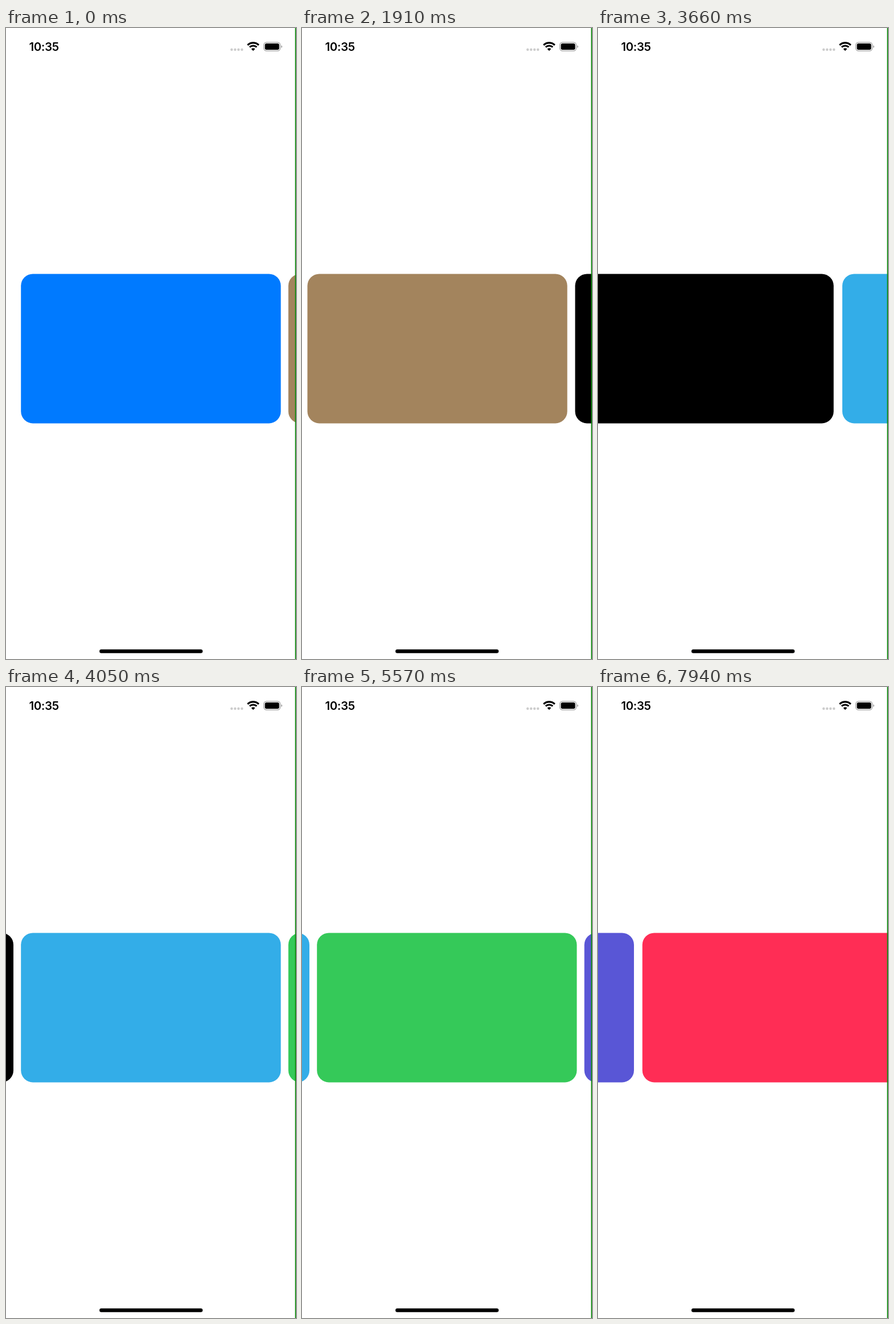
These frames come from a looping animation (508x1102 px, 8000 ms). An HTML page:

```html
<!DOCTYPE html>
<html lang="en">
<head>
<meta charset="utf-8">
<title>Card carousel</title>
<style>
  html, body { margin: 0; width: 100%; height: 100%; overflow: hidden; background: #fff; }
  svg { display: block; width: 100%; height: 100%; }
  text { font: 600 20.3px Inter, "Liberation Sans", sans-serif; letter-spacing: -.3px; }
</style>
</head>
<body>
<svg viewBox="0 0 508 1102">
  <g id="cards"></g>
  <path d="M507.2 0V1102" stroke="#0d8a0d" stroke-width="1.6"/>

  <text x="40.4" y="40">10:35</text>
  <g fill="#ccc">
    <circle cx="395.3" cy="37.8" r="2.2"/>
    <circle cx="401.3" cy="37.8" r="2.2"/>
    <circle cx="407.3" cy="37.8" r="2.2"/>
    <circle cx="413.3" cy="37.8" r="2.2"/>
  </g>
  <g transform="translate(433 40)">
    <g fill="none" stroke="#000" stroke-width="3.1">
      <path d="M-9.8 -10.2A14.3 14.3 0 0 1 9.8 -10.2"/>
      <path d="M-6.2 -6.6A9.1 9.1 0 0 1 6.2 -6.6"/>
    </g>
    <path d="M0 0L-3.4 -3.5A4.9 4.9 0 0 1 3.4 -3.5Z"/>
  </g>
  <rect x="451.6" y="25.1" width="28.8" height="14.8" rx="4.6" fill="none" stroke="#999" stroke-width="1.2"/>
  <rect x="453.5" y="27" width="25" height="11" rx="2.7"/>
  <path d="M482 30.2Q483.8 30.8 483.8 32.5T482 34.8Z" fill="#999"/>
  <rect x="163.7" y="1085.3" width="180.8" height="6.4" rx="3.2"/>
</svg>
<script>
const LOOP = 8000, STEP = 56.25, LEFT = 26.2, PITCH = 468.4;
const colors = ["#007aff", "#a3845d", "#000", "#33ade8", "#35c959", "#5956d6", "#ff2d55"];
// Each swipe: start in ms, length in steps
const swipes = [[500, 4], [1910, 9], [3600, 9], [5120, 9], [6650, 9], [7770, 5.8]];

const group = document.getElementById("cards");
const cards = colors.map(color => {
  const card = document.createElementNS("http://www.w3.org/2000/svg", "rect");
  const attrs = { y: 429.4, width: 455.2, height: 261, rx: 20.8, fill: color };
  for (const name in attrs) card.setAttribute(name, attrs[name]);
  return group.appendChild(card);
});

const ease = u => 1 - (1 - u ** 2.1) ** 3.65;

function draw(t) {
  const next = swipes.findLastIndex(([start]) => t >= start) + 1;
  let p = 1;
  if (next) {
    const [start, length] = swipes[next - 1];
    const step = Math.floor((t - start + 6) / STEP) + 1;
    p = ease(Math.min(1, step / length));
  }
  // Incoming cards trail slightly while moving
  const lag = 16 * p * (1 - p);
  cards.forEach((card, i) => {
    card.setAttribute("x", LEFT + PITCH * (i - next + 1 - p) + (i >= next ? lag : 0));
  });
}

const origin = performance.now();
function tick() {
  draw((performance.now() - origin) % LOOP);
  requestAnimationFrame(tick);
}
tick();
</script>
</body>
</html>
```
